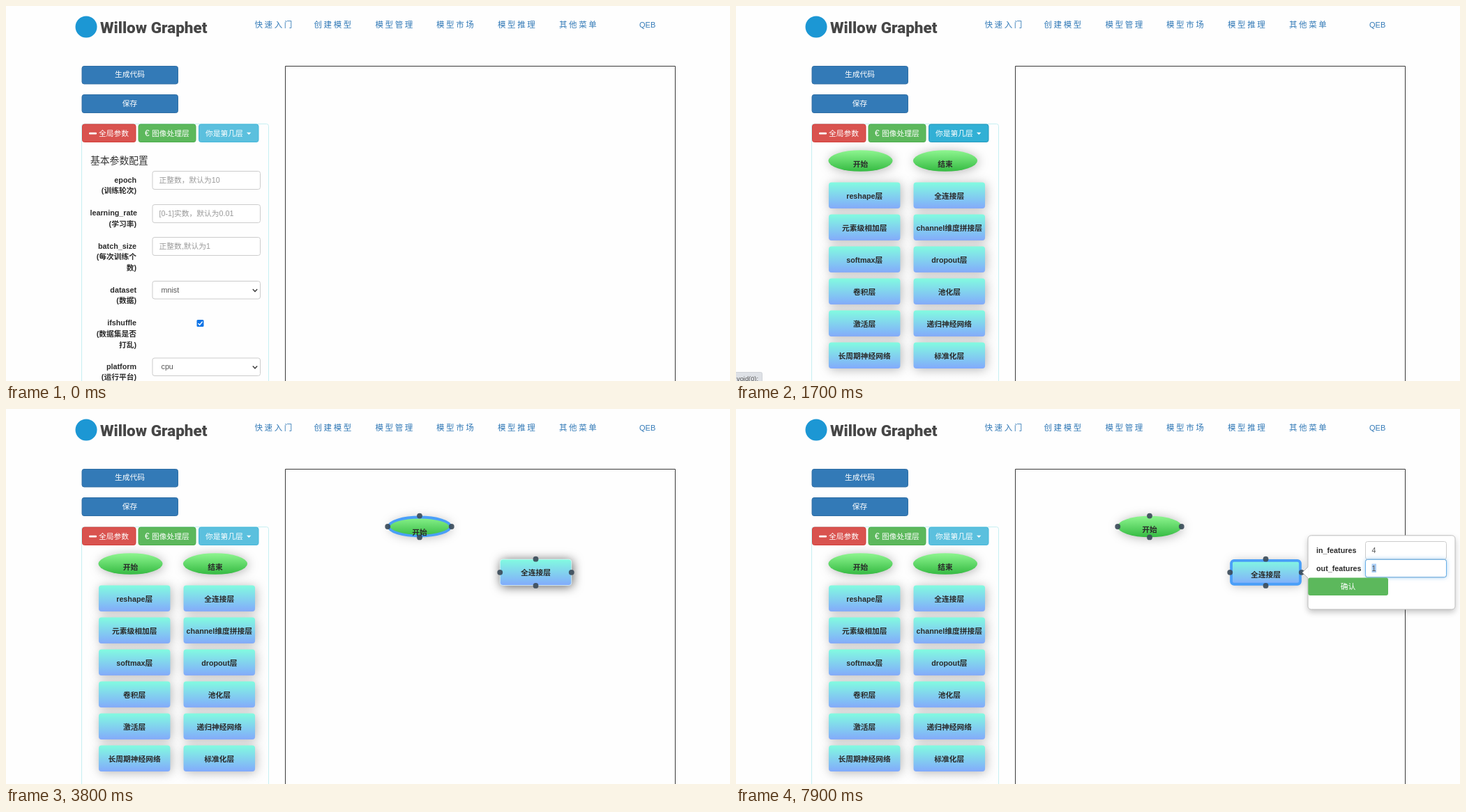
Write an HTML page with a canvas that moves like this. It is 1038x539 px and loops after 8000 ms.

```html
<!DOCTYPE html>
<html lang="zh-CN">
<head>
<meta charset="utf-8">
<title>Model editor</title>
<style>
  html, body { margin: 0; width: 100%; height: 100%; overflow: hidden; background: #fefefe; }
  canvas { display: block; }
</style>
</head>
<body>
<canvas id="stage" width="1038" height="539"></canvas>
<script>
const ctx = document.getElementById('stage').getContext('2d');
const LOOP = 8000, STEP = 100;
const SANS = '"Liberation Sans", "Noto Sans CJK SC", "Noto Sans CJK", sans-serif';
const BLUE = '#337ab7', INK = '#2b2b2b', GREY = '#555';

// y is the vertical middle of the line
function text(str, x, y, o = {}) {
  const size = o.size || 10.75;
  ctx.font = `${o.weight || 400} ${size}px ${o.font || SANS}`;
  ctx.textAlign = o.align || 'left';
  ctx.letterSpacing = (o.spacing || 0) + 'px';
  ctx.fillStyle = o.color || INK;
  ctx.fillText(str, x, y + size * 0.36);
}

function box(x, y, w, h, o = {}) {
  ctx.beginPath();
  ctx.roundRect(x, y, w, h, o.r ?? 3);
  if (o.fill) { ctx.fillStyle = o.fill; ctx.fill(); }
  ctx.shadowColor = 'transparent';
  if (o.line) {
    ctx.strokeStyle = o.line;
    ctx.lineWidth = o.width || 1;
    ctx.stroke();
  }
}

function poly(points, fill, line, width = 1) {
  ctx.beginPath();
  points.forEach(([x, y], i) => i ? ctx.lineTo(x, y) : ctx.moveTo(x, y));
  if (fill) { ctx.fillStyle = fill; ctx.fill(); }
  if (line) { ctx.strokeStyle = line; ctx.lineWidth = width; ctx.stroke(); }
}

function shadow(color, blur, dx, dy) {
  ctx.shadowColor = color;
  ctx.shadowBlur = blur;
  ctx.shadowOffsetX = dx;
  ctx.shadowOffsetY = dy;
}

function faded(alpha, draw) {
  if (alpha <= 0) return;
  ctx.save();
  ctx.globalAlpha = alpha;
  draw();
  ctx.restore();
}

// value of the last [time, value] pair already reached
function at(t, keys) {
  let value = keys[0][1];
  for (const [time, v] of keys) if (t >= time) value = v;
  return value;
}

function header() {
  ctx.beginPath();
  ctx.arc(115, 30, 15.5, 0, 7);
  ctx.fillStyle = '#1c97d4';
  ctx.fill();
  text('Willow Graphet', 135, 30.5, { size: 22.5, weight: 900, font: 'Roboto, sans-serif', color: '#464646' });
  const menu = [['快速入门', 356.5], ['创建模型', 441.5], ['模型管理', 529.5],
    ['模型市场', 617], ['模型推理', 705], ['其他菜单', 793]];
  for (const [name, x] of menu) text(name, x, 27, { size: 11.5, spacing: 2.6, color: BLUE });
  text('QEB', 908, 27, { size: 11, color: BLUE });
}

function sideButtons(hot) {
  const white = { color: '#fff' }, mid = { color: '#fff', align: 'center' };
  box(109, 86.5, 137.5, 25.5, { fill: BLUE, line: '#2e6da4' });
  text('生成代码', 177.5, 98.5, mid);
  box(109, 127.5, 137.5, 26, { fill: BLUE, line: '#2e6da4' });
  text('保存', 177.5, 140.5, mid);

  box(108.5, 169.5, 268, 400, { line: '#c6eff2' });
  box(109.5, 170, 76.5, 25.5, { fill: '#d9534f', line: '#d43f3a' });
  box(119, 181.8, 11, 2.8, { fill: '#fff', r: 1 });
  text('全局参数', 133, 183, white);
  box(190, 170, 82, 25.5, { fill: '#5cb85c', line: '#4cae4c' });
  text('€', 199, 183, { color: '#fff', size: 12 });
  text('图像处理层', 209, 183, white);
  box(276.5, 170, 85.5, 25.5, hot ? { fill: '#31b0d5', line: '#269abc' } : { fill: '#5bc0de', line: '#46b8da' });
  text('你是第几层', 286, 183, white);
  poly([[345, 181.8], [351.4, 181.8], [348.2, 185]], '#fff');
}

function form() {
  text('基本参数配置', 121, 222, { size: 13.8, color: '#333' });
  const rows = [
    [250, 'epoch', '(训练轮次)'], [297.3, 'learning_rate', '(学习率)'],
    [345, 'batch_size', '(每次训练个', '数)'], [408, 'dataset', '(数据)'],
    [455.5, 'ifshuffle', '(数据集是否', '打乱)'], [518, 'platform', '(运行平台)']];
  for (const [y, ...lines] of rows)
    lines.forEach((s, i) => text(s, s[0] === 'l' ? 188 : 187, y + i * 15.6, { weight: 700, align: 'right' }));

  const fields = [[237.5, '正整数，默认为10'], [285.5, '[0-1]实数，默认为0.01'], [332.5, '正整数,默认为1']];
  for (const [y, hint] of fields) {
    box(210, y, 154.5, 26, { fill: '#fff', line: '#ccc' });
    text(hint, 219.5, y + 12.5, { color: '#999' });
  }
  for (const [y, value] of [[395.5, 'mnist'], [506, 'cpu']]) {
    box(210, y, 154.5, 25.5, { fill: '#fff', line: '#ccc' });
    text(value, 222.5, y + 12.5, { color: GREY });
    poly([[353.8, y + 11.5], [357, y + 14.8], [360.2, y + 11.5]], null, '#444', 1.5);
  }
  box(273.5, 451, 10, 10, { fill: '#0f74e6', r: 1.5 });
  poly([[275.5, 456.2], [277.7, 458.4], [281.6, 453.6]], null, '#fff', 1.5);
}

function dropdown(hover) {
  ctx.save();
  shadow('rgba(0,0,0,.18)', 9, 0, 4.5);
  box(277, 197.5, 121.5, 48.5, { fill: '#fff', line: '#ccc' });
  ctx.restore();
  if (hover) box(277.5, 201.5, 120.5, 20.5, { fill: '#f4f4f4', r: 0 });
  text('简单网络层', 292, 211.5, { color: BLUE });
  text('我的模型', 292, 231.5, { color: BLUE });
}

function statusBar() {
  box(-5, 526.5, 42.5, 20, { fill: '#dee1e6', line: '#d0d3d8', r: 2 });
  text('void(0);', 32, 535.5, { size: 9.3, align: 'right', color: GREY });
}

// (x, y) is the centre; rounds are start and end nodes, the rest are layers
function node(name, x, y, o = {}) {
  const w = o.round ? 91.5 : 102.5, h = o.round ? 30 : 37.5;
  const inset = o.selected ? 1.8 : 0;
  const path = () => {
    ctx.beginPath();
    if (o.round) ctx.ellipse(x, y, w / 2 - inset + 0.3, h / 2 - inset + 0.3, 0, 0, 7);
    else ctx.roundRect(x - w / 2 + inset, y - h / 2 + inset, w - 2 * inset, h - 2 * inset, 4);
  };
  const fill = ctx.createLinearGradient(0, y - h / 2, 0, y + h / 2);
  fill.addColorStop(0, o.round ? '#8df58f' : '#82fbe0');
  fill.addColorStop(1, o.round ? '#36bb43' : '#82aafc');
  ctx.save();
  shadow(o.hover ? '#555' : '#b4b4b4', 14.5, 1.5, 1.5);
  path();
  ctx.fillStyle = fill;
  ctx.fill();
  ctx.restore();
  if (o.selected || o.hover) {
    path();
    ctx.strokeStyle = o.selected ? '#4a9ff8' : 'rgba(225,250,250,.8)';
    ctx.lineWidth = o.selected ? 3.8 : 1;
    ctx.stroke();
  }
  if (o.handles) {
    ctx.fillStyle = 'rgba(60,76,90,.92)';
    for (const [dx, dy] of [[-1, 0], [1, 0], [0, -1], [0, 1]]) {
      ctx.beginPath();
      ctx.arc(x + dx * w / 2, y + dy * (h / 2 + 0.4), 3.9, 0, 7);
      ctx.fill();
    }
  }
  const drop = (o.round ? 4.5 : 0.5) + (o.selected ? 3.2 : 0);
  text(name, x, y + drop, { weight: 700, align: 'center' });
}

function palette(hover) {
  const names = ['reshape层', '全连接层', '元素级相加层', 'channel维度拼接层', 'softmax层', 'dropout层',
    '卷积层', '池化层', '激活层', '递归神经网络', '长周期神经网络', '标准化层'];
  node('开始', 178.5, 222.5, { round: true, hover: hover === '开始' });
  node('结束', 300, 222.5, { round: true });
  names.forEach((name, i) =>
    node(name, i % 2 ? 305.8 : 184.2, 272.3 + 46 * (i >> 1), { hover: hover === name }));
}

function field(y, value, focus) {
  ctx.save();
  if (focus) shadow(`rgba(102,175,233,${0.7 * focus})`, 6, 0, 0);
  box(902.5, y, 116, 25.5, { fill: '#fff', line: '#ccc' });
  ctx.restore();
  faded(focus, () => box(902.5, y, 116, 25.5, { line: '#66afe9' }));
  text(value, 911.5, y + 12.5, { color: GREY });
}

function popover(t) {
  ctx.save();
  shadow('rgba(0,0,0,.24)', 9, 0, 4);
  box(820, 181.8, 211, 106.2, { fill: '#fff', line: '#bdbdbd', r: 4.5 });
  ctx.restore();
  poly([[820.8, 226.5], [812, 235], [820.8, 243.5]], '#fff');
  poly([[820, 227], [812, 235], [820, 243]], null, '#b5b5b5');

  const first = at(t, [[0, 0], [6200, 0.5], [6300, 1], [7800, 0.5], [7900, 0]]);
  const second = at(t, [[0, 0], [7800, 0.5], [7900, 1]]);
  const value = at(t, [[0, '1'], [6700, ''], [7400, '4']]);
  text('in_features', 832, 203, { weight: 700 });
  text('out_features', 832, 229, { weight: 700 });
  field(190.5, value, first);
  field(216.3, '1', second);
  if (t >= 6200 && t < 7800) box(value ? 917 : 911.5, 197, 1, 12, { fill: '#333', r: 0 });
  if (t >= 7800) {
    box(911.5, 222.5, 6.5, 12.5, { fill: '#a9cdf5', r: 0 });
    text('1', 911.5, 228.8, { color: GREY });
  }
  box(820.3, 242.5, 114.7, 25.5, { fill: '#5cb85c' });
  text('确认', 877.5, 255, { color: '#fff', align: 'center' });
}

function dialog() {
  ctx.save();
  shadow('rgba(0,0,0,.4)', 5, 0, 1.5);
  box(368.5, -20, 344, 82.5, { fill: '#fff', line: '#b8b8b8', r: 2 });
  ctx.restore();
  text('确定要删除吗?', 380.5, 6, { size: 9.6, color: GREY });
  box(595.5, 26, 49.5, 24.5, { fill: '#4285ee' });
  text('确定', 620, 38.5, { size: 9.4, color: '#fff', align: 'center' });
  box(651.5, 26, 48.5, 24, { fill: '#fff', line: '#dadce0' });
  text('取消', 675.5, 38.5, { size: 9.4, color: '#2f78e4', align: 'center' });
}

function draw(t) {
  ctx.globalAlpha = 1;
  ctx.fillStyle = '#fefefe';
  ctx.fillRect(0, 0, 1038, 539);
  header();
  box(400.5, 86.5, 559, 500, { line: '#3a3a3a', r: 0 });
  sideButtons(t >= 700 && t < 1900);

  if (t < 1700) form();
  else palette(at(t, [[0, ''], [2100, '开始'], [2400, ''], [3200, '全连接层'], [3500, '']]));
  faded(at(t, [[0, 0], [900, 0.6], [1000, 1], [1700, 0]]), () => dropdown(t >= 1400));
  faded(at(t, [[0, 0], [1400, 0.5], [1500, 1], [1800, 0.5], [1900, 0]]), statusBar);

  if (t >= 2400) {
    const [x, y] = at(t, [[2400, [436, 189.5]], [2500, [562, 173]], [2600, [593, 169]]]);
    node('开始', x, y, {
      round: true, hover: t < 2900, handles: t >= 2600, selected: t >= 2800 && t < 4000
    });
  }
  if (t >= 3500) {
    const [x, y] = at(t, [[3500, [454, 262]], [3600, [655, 243]], [3700, [759.5, 234.8]]]);
    node('全连接层', x, y, { hover: t < 5800, handles: t >= 3800, selected: t >= 4000 });
  }
  if (t >= 4100) popover(t);
  faded(at(t, [[0, 0], [4400, 0.35], [4500, 0.8], [4600, 1], [5600, 0.6], [5700, 0.2], [5800, 0]]), dialog);
}

const start = performance.now();
function tick() {
  const t = (performance.now() - start) % LOOP;
  draw(Math.floor(t / STEP) * STEP);
  requestAnimationFrame(tick);
}
tick();
</script>
</body>
</html>
```
